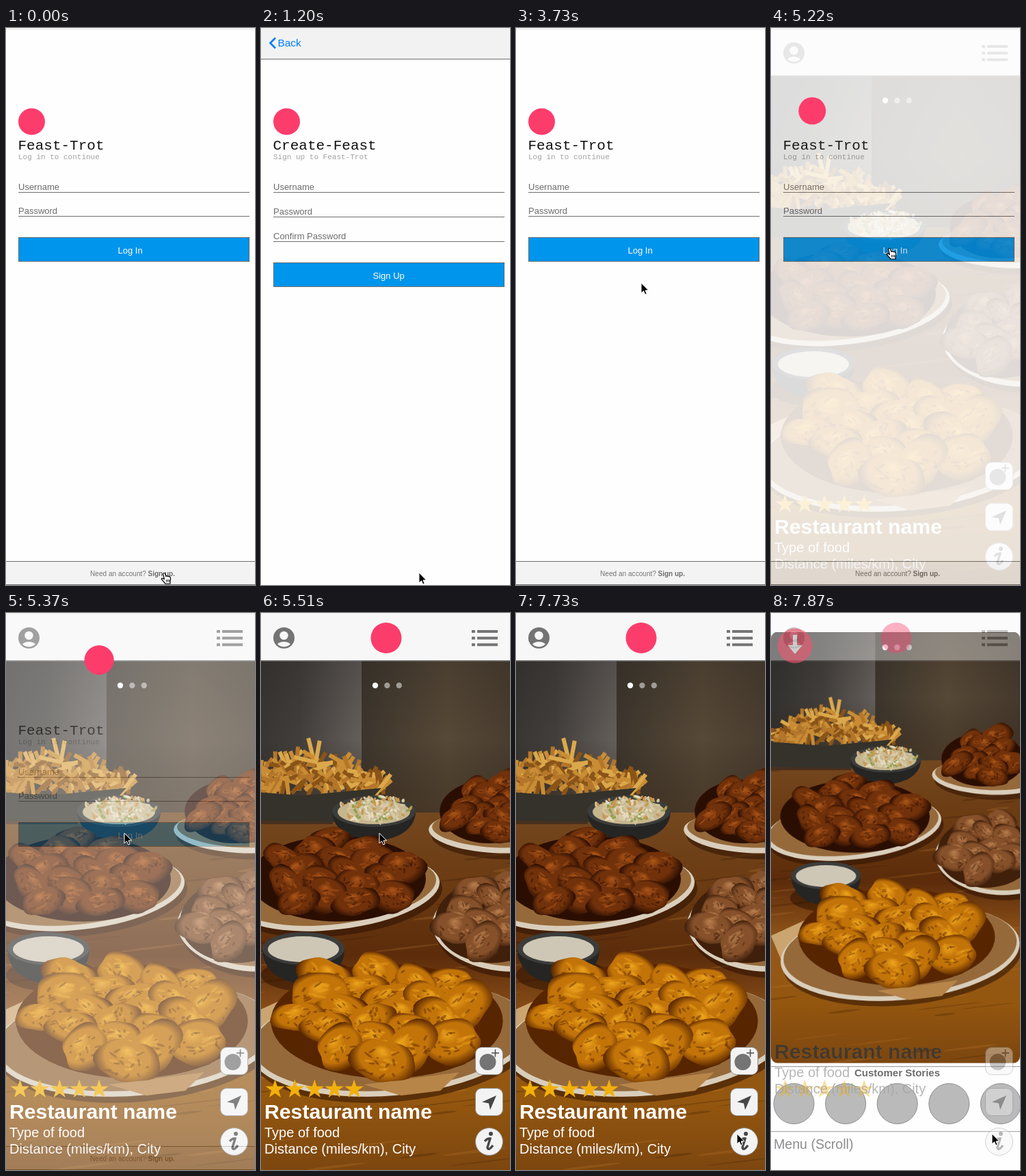
An HTML page with a canvas for the animation above (8 s loop, 364x815 px).

```html
<!DOCTYPE html>
<html lang="en">
<head>
<meta charset="utf-8">
<title>Food finder app</title>
<style>
  html, body { margin: 0; width: 100%; height: 100%; overflow: hidden; background: #fefefe; }
  canvas { display: block; width: 364px; height: 815px; }
</style>
</head>
<body>
<canvas id="stage"></canvas>
<script>
const W = 364, H = 815, LOOP = 8000, TICK = 148.4;
const SANS = '"Liberation Sans", Arial, sans-serif';
const MONO = '"Liberation Mono", "Courier New", monospace';
const PINK = '#fc3d6c', LINE = '#6f6f6f', ICON = '#747474', PAPER = '#fefefe';
const dpr = window.devicePixelRatio || 1;

const mix = (a, b, p) => a + (b - a) * p;
const clamp = v => Math.min(1, Math.max(0, v));
const smooth = v => { v = clamp(v); return v * v * (3 - 2 * v); };
const fade = (t, start) => smooth((t - start + 100) / 400);

function makeCtx(w, h, canvas = document.createElement('canvas')) {
  canvas.width = Math.round(w * dpr);
  canvas.height = Math.round(h * dpr);
  const c = canvas.getContext('2d');
  c.scale(dpr, dpr);
  return c;
}

let g = makeCtx(W, H, document.getElementById('stage'));
const pool = [];
let depth = 0;

// Draws a set of shapes as one layer with a common opacity
function group(alpha, draw) {
  if (alpha <= 0) return;
  if (alpha >= 1) return draw();
  const outer = g, layer = pool[depth] || (pool[depth] = makeCtx(W, H));
  depth++;
  layer.clearRect(0, 0, W, H);
  g = layer;
  draw();
  g = outer;
  depth--;
  g.globalAlpha = alpha;
  g.drawImage(layer.canvas, 0, 0, W, H);
  g.globalAlpha = 1;
}

function rect(x, y, w, h, fill) { g.fillStyle = fill; g.fillRect(x, y, w, h); }
function text(s, x, y, size, color, family = SANS, style = '') {
  g.font = `${style} ${size}px ${family}`;
  g.fillStyle = color;
  g.fillText(s, x, y);
}
function oval(x, y, rx, ry, fill, turn = 0) {
  g.beginPath();
  g.ellipse(x, y, rx, ry, turn, 0, 7);
  g.fillStyle = fill;
  g.fill();
}
const disc = (x, y, r, fill) => oval(x, y, r, r, fill);
function stroke(width, color) {
  g.lineWidth = width;
  g.strokeStyle = color;
  g.stroke();
}
function trace(points) {
  g.beginPath();
  points.forEach(([x, y]) => g.lineTo(x, y));
}
function poly(points, fill) {
  trace(points);
  g.closePath();
  g.fillStyle = fill;
  g.fill();
}
function line(points, width, color) { trace(points); stroke(width, color); }
function blend(x0, y0, x1, y1, ...colors) {
  const f = g.createLinearGradient(x0, y0, x1, y1);
  colors.forEach((c, i) => f.addColorStop(i / (colors.length - 1), c));
  return f;
}

// ---- Food picture, painted once ----
let seed = 11;
const rnd = (a = 0, b = 1) => {
  seed = (seed * 16807) % 2147483647;
  return a + (b - a) * seed / 2147483647;
};
const pick = list => list[Math.floor(rnd(0, list.length))];
function scatter(n, x, y, rx, ry, put) {
  for (let i = 0; i < n; i++) {
    const a = rnd(0, 6.28), r = Math.sqrt(rnd());
    put(x + Math.cos(a) * r * rx, y + Math.sin(a) * r * ry);
  }
}

function wing(x, y, r, [light, mid, dark]) {
  const flat = rnd(.55, .8);
  g.save();
  g.translate(x, y);
  g.rotate(rnd(-.7, .7));
  g.scale(1, flat);
  const f = g.createRadialGradient(-r * .1, -r * .4, 0, 0, 0, r * 1.05);
  [light, mid, mid, dark].forEach((c, i) => f.addColorStop(i / 3, c));
  g.beginPath();
  const bump = rnd(0, 6), bend = rnd(.08, .16);
  for (let a = 0; a < 6.28; a += .2) {
    const k = r * (.92 + bend * Math.sin(2 * a + bump) + .04 * Math.sin(5 * a));
    g.lineTo(Math.cos(a) * k, Math.sin(a) * k);
  }
  g.fillStyle = f;
  g.fill();
  g.globalAlpha = .45;
  scatter(9, 0, -r * .15, r * .6, r * .5, (u, v) => oval(u, v, r * rnd(.06, .2), r * .06, light, rnd(-.6, .6)));
  scatter(14, 0, r * .1, r * .75, r * .65, (u, v) => oval(u, v, r * rnd(.03, .16), r * .04, dark, rnd(0, 3)));
  g.restore();
}

// Wings on a sunflower spiral, back ones first
function pile(x, y, rx, ry, n, size, tones) {
  oval(x, y + size * .2, rx + size * .6, ry + size * .3, tones[2]);
  Array.from({ length: n }, (_, i) => {
    const a = i * 2.4, k = Math.sqrt((i + .5) / n);
    return [x + Math.cos(a) * k * rx, y + Math.sin(a) * k * ry];
  }).sort((a, b) => a[1] - b[1]).forEach(([u, v]) => wing(u, v, size * rnd(.85, 1.15), tones));
}
function plate(x, y, rx, ry, turn) {
  oval(x + 4, y + 9, rx, ry, 'rgba(45,18,2,.55)', turn);
  oval(x, y, rx, ry, '#d9cebb', turn);
  oval(x, y - 4, rx - 5, ry - 4, '#95693a', turn);
}
function bowl(x, y, rx, ry, deep, food) {
  g.beginPath();
  g.moveTo(x - rx, y);
  g.bezierCurveTo(x - rx, y + deep * 1.3, x + rx, y + deep * 1.3, x + rx, y);
  g.fillStyle = '#252524';
  g.fill();
  oval(x, y, rx, ry, '#3c3d3b');
  oval(x, y + 1, rx - 8, ry - 5, food);
}

function paintFood() {
  const page = g;
  g = makeCtx(430, 745);
  g.translate(33, -70);
  rect(-33, 70, 430, 250, '#4b4137');
  rect(-33, 70, 180, 250, blend(-33, 0, 147, 0, '#343332', '#45423f', '#6b6662'));
  rect(147, 70, 250, 250, blend(147, 0, 397, 0, '#3f382f', '#5c4d3a', '#483c2f'));
  rect(-33, 70, 430, 230, blend(0, 70, 0, 300, 'rgba(30,27,25,.3)', 'rgba(40,32,24,.1)', 'rgba(60,42,25,.6)'));
  rect(-33, 292, 430, 523, blend(0, 292, 0, 815, '#74481f', '#6b3b12', '#5c2c0b', '#95581b', '#94570f', '#7c460f'));
  for (let i = 0; i < 70; i++)
    oval(rnd(-30, 397), rnd(300, 815), rnd(12, 60), rnd(.5, 2), pick(['rgba(50,20,0,.25)', 'rgba(205,135,55,.2)']), -.12);

  rect(-33, 285, 138, 24, '#47301e');
  for (let x = -30; x < 180; x += 1.5) {
    g.save();
    g.translate(x, rnd(255 - 55 * Math.exp(-(((x - 70) / 80) ** 2)), 258));
    g.rotate(rnd(-1.5, 1.5));
    rect(-3, -18, 6, 36, pick(['#8a5418', '#c98d35', '#dba84c', '#b3762a']));
    g.restore();
  }
  poly([[-33, 260], [60, 267], [176, 256], [130, 306], [-33, 303]], '#34322a');

  bowl(165, 290, 61, 23, 44, '#c6b68e');
  scatter(130, 165, 286, 54, 19, (x, y) =>
    oval(x, y, rnd(2, 6), 1.8, pick(['#e4dac0', '#d3c39c', '#d8caa8', '#8d9f4c', '#c9974f']), rnd(0, 3)));

  const brown = ['#ad5618', '#71310a', '#2b0e02'];
  plate(340, 322, 95, 29, .06);
  pile(333, 285, 55, 38, 12, 28, brown);
  plate(110, 410, 152, 53, -.12);
  pile(112, 382, 108, 52, 17, 35, brown);
  plate(354, 464, 104, 60, .12);
  pile(338, 444, 62, 50, 11, 36, ['#b97f4e', '#85502a', '#40200b']);

  oval(68, 530, 68, 24, 'rgba(40,15,0,.5)');
  bowl(62, 491, 60, 24, 52, '#cfc7b6');

  poly([[-33, 595], [50, 557], [90, 640], [-14, 640]], '#cba570');
  plate(190, 624, 207, 82, -.09);
  poly([[150, 690], [290, 672], [262, 699], [205, 706]], '#b88549');
  pile(184, 588, 142, 70, 21, 46, ['#eea51c', '#c27409', '#572500']);
  const c = g.canvas;
  g = page;
  return c;
}
const food = paintFood();

// ---- Screens ----
function heading(title, note) {
  text(title, 17.5, 178, 21, '#111', MONO);
  text(note, 18, 192, 11, '#a2a2a2', MONO);
}
function field(label, y) {
  text(label, 18, y - 3.5, 13, '#6c6c6c');
  rect(18, y, 338, 1, LINE);
}
function button(label, y) {
  rect(18, y, 338, 36, LINE);
  rect(19, y + 1, 336, 34, '#0095ec');
  text(label, 163.5, y + 24, 13, '#fff');
}

function login() {
  rect(0, 0, W, H, PAPER);
  rect(0, 0, W, 3, '#f2f2f2');
  heading('Feast-Trot', 'Log in to continue');
  field('Username', 240);
  field('Password', 275);
  button('Log In', 306);
  rect(0, 780, W, 35, LINE);
  rect(0, 781, W, 33, '#f3f3f3');
  text('Need an account?', 123, 802, 10.1, '#747474');
  text('Sign up.', 207.5, 802, 10, '#6c6c6c', SANS, 'bold');
}

function signup() {
  rect(0, 0, W, H, PAPER);
  rect(0, 0, W, 45, '#f2f2f2');
  rect(0, 45, W, 1, LINE);
  line([[21, 14.5], [13.5, 22], [21, 29.5]], 2.6, '#007aff');
  text('Back', 24.5, 27, 15.4, '#007aff');
  heading('Create-Feast', 'Sign up to Feast-Trot');
  ['Username', 'Password', 'Confirm Password'].forEach((s, i) => field(s, 240 + 36 * i));
  button('Sign Up', 343);
}

function picture(p) {
  const top = mix(70, 0, p), h = mix(815, 557, p) - top, s = h / 745;
  g.save();
  g.beginPath();
  g.roundRect(0, top, W, h, 16 * p);
  g.clip();
  g.drawImage(food, 182 - 215 * s, top, 430 * s, h);
  g.restore();
}

function star(x, y, r) {
  poly(Array.from({ length: 10 }, (_, i) => {
    const a = i * Math.PI / 5, k = i % 2 ? r * .39 : r;
    return [x + Math.sin(a) * k, y - Math.cos(a) * k];
  }), '#f2b00c');
}

function tile(y, r) {
  g.beginPath();
  g.roundRect(313.5, y, 40, 40, r);
  g.fillStyle = '#f3f3f3';
  g.fill();
  stroke(1, '#8c8c8c');
}

function profile() {
  disc(33.5, 36.5, 15.5, ICON);
  g.save();
  g.beginPath();
  g.arc(33.5, 36.5, 13, 0, 7);
  g.clip();
  disc(33.5, 33, 6.2, '#f7f7f7');
  oval(33.5, 49, 11, 7, '#f7f7f7');
  g.restore();
}

function info() {
  disc(336, 762, 3, '#464646');
  g.beginPath();
  g.moveTo(327, 773);
  g.quadraticCurveTo(331, 768, 335, 769);
  g.lineTo(331, 782);
  g.quadraticCurveTo(332, 788, 339, 779);
  stroke(3.4, '#464646');
}

function controls() {
  rect(0, 0, W, 69, '#f7f7f7');
  rect(0, 69, W, 1.5, '#858585');
  profile();
  for (let y = 25; y < 48; y += 9.7) {
    rect(308, y, 5, 4, ICON);
    rect(316, y, 30, 4, ICON);
  }
  for (let i = 0; i < 5; i++) star(20.5 + i * 28.9, 697, 14.5);
  tile(635.5, 9);
  disc(331.5, 657, 12, ICON);
  rect(337, 643, 11, 1.6, '#555');
  rect(341.7, 638.5, 1.6, 11, '#555');
  tile(695.5, 9);
  poly([[344, 706], [323, 715.5], [333, 717.5], [335, 727]], '#464646');
  tile(753.5, 20);
  info();
}

function details() {
  rect(0, 663, W, 1.2, '#666');
  rect(0, 758, W, 1.2, '#777');
  text('Customer Stories', 122, 678, 15, '#111', SANS, 'bold');
  for (let i = 0; i < 5; i++) {
    disc(33.5 + i * 75.6, 718, 29.5, '#8f8f8f');
    stroke(1, '#444');
  }
  text('Menu (Scroll)', 4, 784, 19.6, '#444');
}

function badge() {
  disc(35, 48, 25.5, '#f0566f');
  rect(32, 32, 6, 18, '#fff');
  poly([[24, 47], [46, 47], [35, 60]], '#fff');
}

function caption(p, main, small) {
  const dy = -145 * p;
  text('Restaurant name', 5, 740 + dy, 30.2, main, SANS, 'bold');
  text('Type of food', 5, 767 + dy, 20, small);
  text('Distance (miles/km), City', 5, 791 + dy, 20, small);
}

function home(p) {
  rect(0, 0, W, H, PAPER);
  picture(p);
  group(p, details);
  group(1 - p, controls);
  group(p, badge);
  [1, .5, .5].forEach((a, i) => disc(167 + i * 17.4, mix(106, 14, p), 4.2, `rgba(255,255,255,${a})`));
  group(1 - p, () => caption(p, '#fff', '#fff'));
  group(p, () => caption(p, '#000', '#888'));
}

// ---- Pointer ----
// Each move: start, end, x, y, sideways bend
const moves = [
  [1850, 2370, 183, 373, -55], [4200, 4450, 173, 322, 0],
  [6420, 6820, 277, 514, 0], [7000, 7700, 323, 762, 0]
];
const pointing = t => t < 890 || (t > 2670 && t < 3410) || (t > 4450 && t < 5340);

function pointerAt(t) {
  let x = 231, y = 797;
  for (const [from, to, nx, ny, bend] of moves) {
    const p = smooth((t - from) / (to - from));
    x = mix(x, nx, p) + bend * Math.sin(p * Math.PI);
    y = mix(y, ny, p);
  }
  return [x, y];
}
function arrow() {
  poly([[0, 0], [0, 15], [3.5, 11.8], [5.8, 17], [8.2, 16], [6, 11], [10.6, 10.8]], '#000');
  stroke(1, '#fff');
}
function hand() {
  g.beginPath();
  g.moveTo(-1.5, 1.5);
  g.quadraticCurveTo(.2, -1, 1.6, 1.5);
  g.lineTo(3, 5.5);
  g.quadraticCurveTo(4.5, 4, 5.6, 5.6);
  g.quadraticCurveTo(7.4, 4.4, 8.2, 6.2);
  g.quadraticCurveTo(10.5, 6, 9, 13);
  g.lineTo(9, 16);
  g.lineTo(2, 16);
  g.quadraticCurveTo(-1, 13, -3.8, 9.2);
  g.quadraticCurveTo(-3.6, 6.8, .4, 9.5);
  g.closePath();
  g.fillStyle = '#fff';
  g.fill();
  stroke(1.2, '#000');
  for (let x = 3; x < 8; x += 2) rect(x, 10, .9, 3.5, '#000');
}

function draw(t) {
  const join = fade(t, 742) - fade(t, 3265);
  const enter = fade(t, 5194);
  const open = 1 - (1 - clamp((t - 7718) / 395)) ** 2;
  login();
  group(join, signup);
  group(enter, () => home(open));
  group(1 - open, () => disc(mix(37.5, 183, enter), mix(137, 36.5, enter), mix(19.5, 22.5, enter), PINK));
  g.save();
  g.lineJoin = 'round';
  g.translate(...pointerAt(t));
  (pointing(t) ? hand : arrow)();
  g.restore();
}

// The screen refreshes at a slow fixed beat
let shown = -1;
function tick() {
  const beat = Math.floor(performance.now() % LOOP / TICK);
  if (beat !== shown) draw((shown = beat) * TICK);
  requestAnimationFrame(tick);
}
tick();
</script>
</body>
</html>
```
